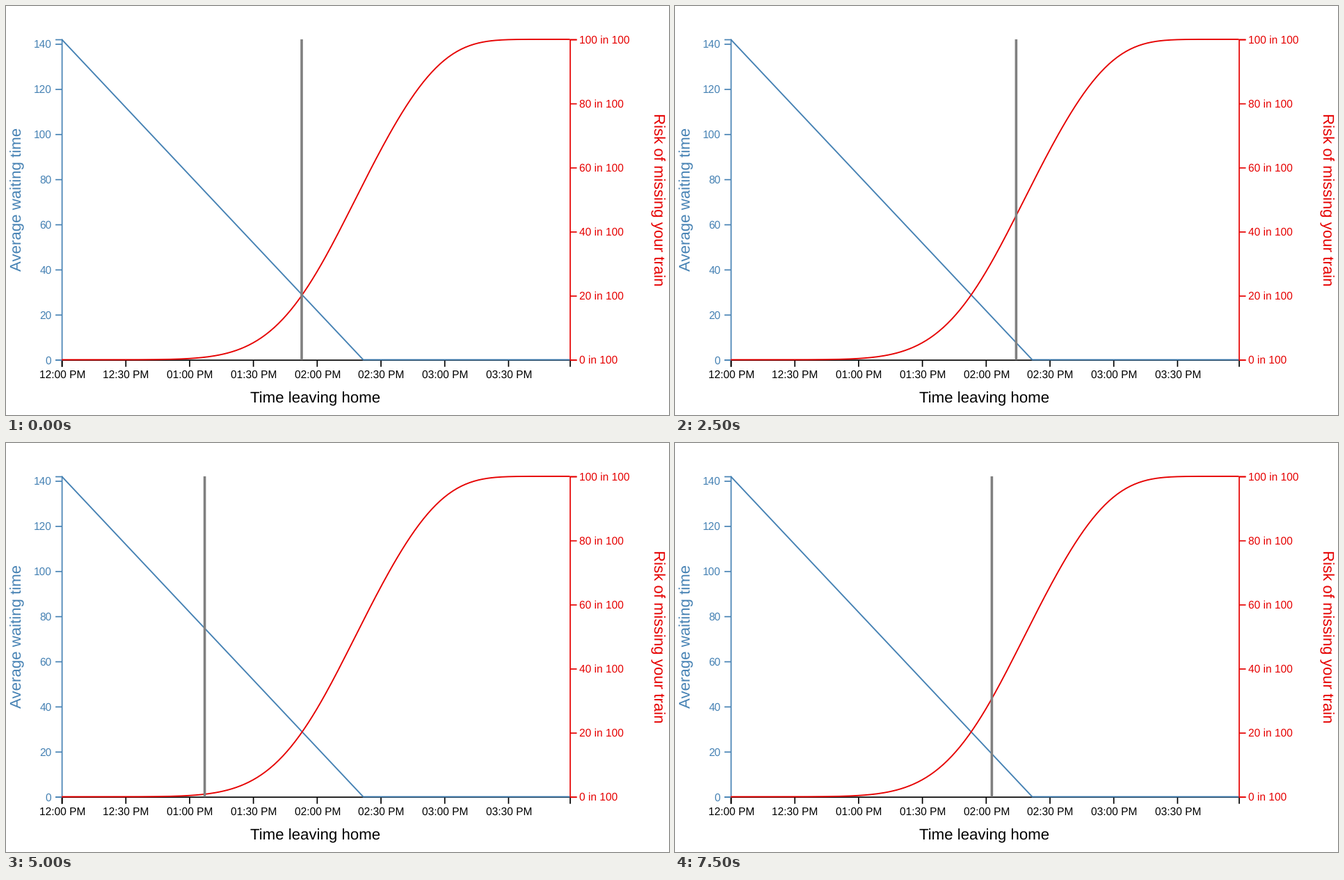
A matplotlib script for the animation above (8 s loop, 953 px wide and 588 px high).

```python
import math

import numpy as np
import matplotlib.pyplot as plt
from matplotlib.animation import FuncAnimation

plt.rcParams["font.family"] = "Liberation Sans"
plt.rcParams["text.hinting"] = "none"
plt.rcParams["path.snap"] = False

W, H, DPI = 953, 588, 128
PX = 72 / DPI  # points per pixel
LEFT, RIGHT, TOP, BASE = 80, 810.4, 47.9, 508.6
SHIFT = 0.6  # axes sit slightly right of and below the curves
BLUE, RED, GRAY = "#4682b4", "#e60000", "#808080"
TICK, LABEL, TITLE = 9.5, 15.5, 22.2
PER_MIN = (RIGHT - LEFT) / 239

# Slider position in pixels, one stop per half second
STOPS = [425, 427, 437.6, 470, 501, 490.4, 455.6, 425,
         363, 269.7, 285.6, 293.5, 325, 380.6, 427, 455.4]

fig = plt.figure(figsize=(W / DPI, H / DPI), dpi=DPI, facecolor="white")
ax = fig.add_axes([0, 0, 1, 1])
ax.set_xlim(0, W)
ax.set_ylim(H, 0)
ax.axis("off")


def line(xs, ys, color, width=1.9, **kw):
    return ax.plot(xs, ys, color=color, lw=width * PX,
                   solid_capstyle="butt", solid_joinstyle="miter", **kw)[0]


def axis_line(xs, ys, color):
    line(np.add(xs, SHIFT), np.add(ys, SHIFT), color, 1.7)


def text(x, y, s, color, size=LABEL, ha="center", rotation=0):
    ax.text(x, y, s, color=color, fontsize=size * PX, ha=ha, va="baseline",
            rotation=rotation, rotation_mode="anchor")


def wait_y(minutes):
    return BASE - minutes * (BASE - TOP) / 142


def risk_y(share):
    return BASE - share * (BASE - TOP)


def risk(x):
    """Chance of missing the train: a normal curve with a short upper tail."""
    w = (x - 502) / 100
    z = 1.08 * w - 0.015 * w ** 2 + 0.073 * max(w, 0) ** 3
    return 0.5 * (1 + math.erf(z / math.sqrt(2)))


# Time axis
axis_line([LEFT, LEFT, RIGHT, RIGHT], [BASE + TICK, BASE, BASE, BASE + TICK], "black")
for k in range(8):
    x = LEFT + 30 * k * PER_MIN
    axis_line([x, x], [BASE, BASE + TICK], "black")
    text(x + 1, 534.5, f"{(k // 2) or 12:02d}:{30 * (k % 2):02d} PM", "black")
text(445, 570.8, "Time leaving home", "black", TITLE)

# Waiting time axis
axis_line([LEFT - TICK, LEFT, LEFT, LEFT - TICK], [TOP, TOP, BASE, BASE], BLUE)
for m in range(0, 141, 20):
    y = wait_y(m)
    axis_line([LEFT - TICK, LEFT], [y, y], BLUE)
    text(65.5, y + 5.9, str(m), BLUE, ha="right")
text(22.8, 278, "Average waiting time", BLUE, TITLE, rotation=90)

# Risk axis
axis_line([RIGHT + TICK, RIGHT, RIGHT, RIGHT + TICK], [TOP, TOP, BASE, BASE], RED)
for p in range(0, 101, 20):
    y = risk_y(p / 100)
    axis_line([RIGHT, RIGHT + TICK], [y, y], RED)
    text(824.5, y + 5.6, f"{p} in 100", RED, ha="left")
text(931, 278.2, "Risk of missing your train", RED, TITLE, rotation=270)

# Curves
line([LEFT, 513.5, RIGHT], [TOP, BASE, BASE], BLUE)
xs = np.linspace(LEFT, RIGHT, 240)
line(xs, [risk_y(risk(x)) for x in xs], RED)

slider = line([STOPS[0]] * 2, [TOP, 509], GRAY, 3.6, zorder=5)


def update(i):
    slider.set_xdata([STOPS[i]] * 2)
    return (slider,)


anim = FuncAnimation(fig, update, frames=len(STOPS), interval=500,
                     repeat=True, repeat_delay=0, blit=False)
plt.show()
```
